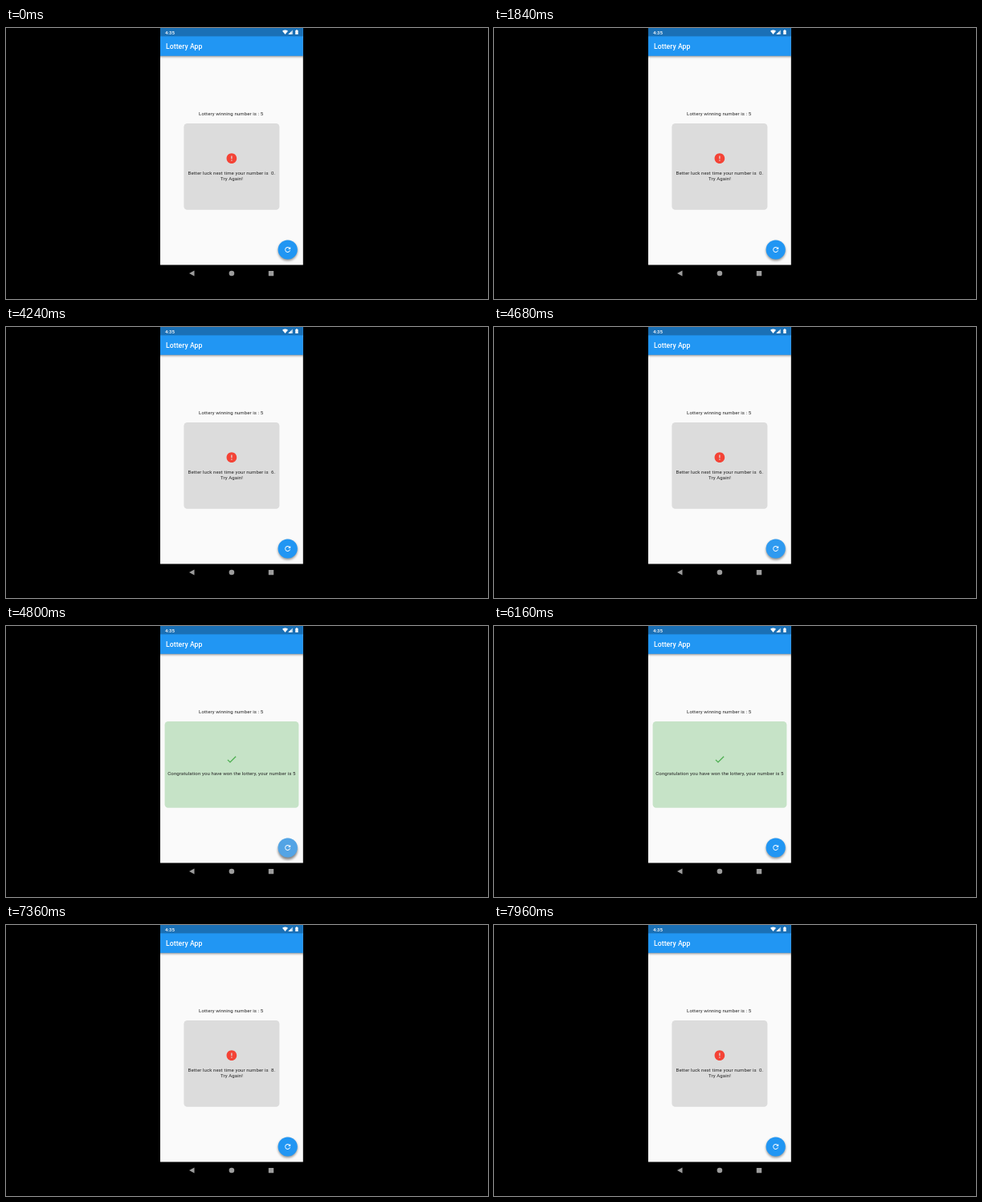
These frames come from a looping animation (600x338 px, 8000 ms). An HTML page:

```html
<!DOCTYPE html>
<html lang="en">
<head>
<meta charset="utf-8">
<title>Lottery App</title>
<style>
  html, body { margin: 0; width: 100%; height: 100%; overflow: hidden; background: #000; }
  svg { display: block; width: 600px; height: 338px; }
  text { font-family: Roboto, sans-serif; white-space: pre; }
  .body { font-size: 6.06px; letter-spacing: .1px; fill: #222; text-anchor: middle; }
  .bar { fill: #fff; font-weight: 500; }
  .shadow { fill: #000; }
</style>
</head>
<body>
<svg viewBox="0 0 600 338">
  <defs>
    <clipPath id="screen"><rect x="192" y="0" width="177.8" height="295.6"/></clipPath>
    <filter id="blur" x="-50%" y="-50%" width="200%" height="200%"><feGaussianBlur stdDeviation="1.7"/></filter>
  </defs>
  <rect width="600" height="338"/>

  <g clip-path="url(#screen)">
    <rect x="192" width="178" height="296" fill="#fafafa"/>
    <rect class="shadow" x="188" y="12" width="186" height="23.6" opacity=".5" filter="url(#blur)"/>
    <rect x="192" width="178" height="34.8" fill="#2196f3"/>
    <rect x="192" width="178" height="10.4" fill="#1a70b6"/>
    <text class="bar" x="198" y="7.7" font-size="6.1">4:35</text>
    <g fill="#fff">
      <path d="M344 3.7Q347.5 1.2 351 3.7L347.5 8.1Z"/>
      <path d="M351.4 8.1L356.8 2.6V8.1Z" opacity=".75"/>
      <path d="M351.4 8.1L355 4.5V8.1Z"/>
      <path d="M360.2 3H361.1V2.3H362.7V3H363.6V8.1H360.2Z"/>
    </g>
    <text class="bar" x="199" y="25.7" font-size="8.66" letter-spacing=".06">Lottery App</text>

    <text class="body" x="280.2" y="108.9">Lottery winning number is : 5</text>

    <g id="lose">
      <rect x="221.4" y="119" width="119" height="107.8" rx="4.3" fill="#dcdcdc"/>
      <path transform="translate(273.3 155.1) scale(.632)" fill="#f44336"
        d="M12 2C6.48 2 2 6.48 2 12s4.48 10 10 10 10-4.48 10-10S17.52 2 12 2zm1 15h-2v-2h2v2zm0-4h-2V7h2v6z"/>
      <text class="body" id="luck" x="280.9" y="182.5"></text>
      <text class="body" x="280.9" y="189.5">Try Again!</text>
    </g>

    <g id="win">
      <rect x="197.6" y="119" width="166.8" height="107.8" rx="4.3" fill="#c6e3c7"/>
      <path transform="translate(273.3 158.8) scale(.632)" fill="#4caf50"
        d="M9 16.17L4.83 12l-1.42 1.41L9 19 21 7l-1.41-1.41z"/>
      <text class="body" x="280.9" y="185.9">Congratulation you have won the lottery, your number is 5</text>
    </g>

    <circle class="shadow" id="drop" cx="350.7" cy="278.4" r="12.1" filter="url(#blur)"/>
    <circle cx="350.7" cy="276.5" r="12.1" fill="#2196f3"/>
    <circle id="ink" cx="350.7" cy="276.5" r="12.1" fill="#c4c4c4"/>
    <path transform="translate(345.5 271.3) scale(.433)" fill="#fff"
      d="M17.65 6.35C16.2 4.9 14.21 4 12 4c-4.42 0-7.99 3.58-7.99 8s3.57 8 7.99 8c3.73 0 6.84-2.55 7.73-6h-2.08c-.82 2.33-3.04 4-5.65 4-3.31 0-6-2.69-6-6s2.69-6 6-6c1.66 0 3.14.69 4.22 1.78L13 11h7V4l-2.35 2.35z"/>
  </g>

  <g fill="#9c9c9c">
    <path d="M228 306L234.5 302.4V309.6Z"/>
    <circle cx="280.9" cy="306" r="3.3"/>
    <rect x="326.8" y="303" width="6.4" height="6.2" rx=".5"/>
  </g>
</svg>
<script>
  const LOOP = 8000, WINNING = 5, DRAW_DELAY = 120;
  // Button presses: start time in ms and the number drawn
  const presses = [[3270, 6], [4640, 5], [6640, 8], [7480, 0]];
  const $ = id => document.getElementById(id);
  const clamp = v => Math.max(0, Math.min(1, v));
  const pressure = dt => Math.min(clamp(dt / 200), clamp((450 - dt) / 200));

  function render(t) {
    let number = 0, press = 0;
    for (const [start, drawn] of presses) {
      if (t >= start + DRAW_DELAY) number = drawn;
      press = Math.max(press, pressure(t - start));
    }
    const won = number === WINNING;
    $('win').style.display = won ? '' : 'none';
    $('lose').style.display = won ? 'none' : '';
    const line = `Better luck next time your number is  ${number}.`;
    if ($('luck').textContent !== line) $('luck').textContent = line;
    $('ink').setAttribute('opacity', press * .38);
    $('drop').setAttribute('cy', 278.1 + press * 1.6);
    $('drop').setAttribute('opacity', .42 + press * .06);
  }

  const began = performance.now();
  function tick() {
    render((performance.now() - began) % LOOP);
    requestAnimationFrame(tick);
  }
  tick();
</script>
</body>
</html>
```
